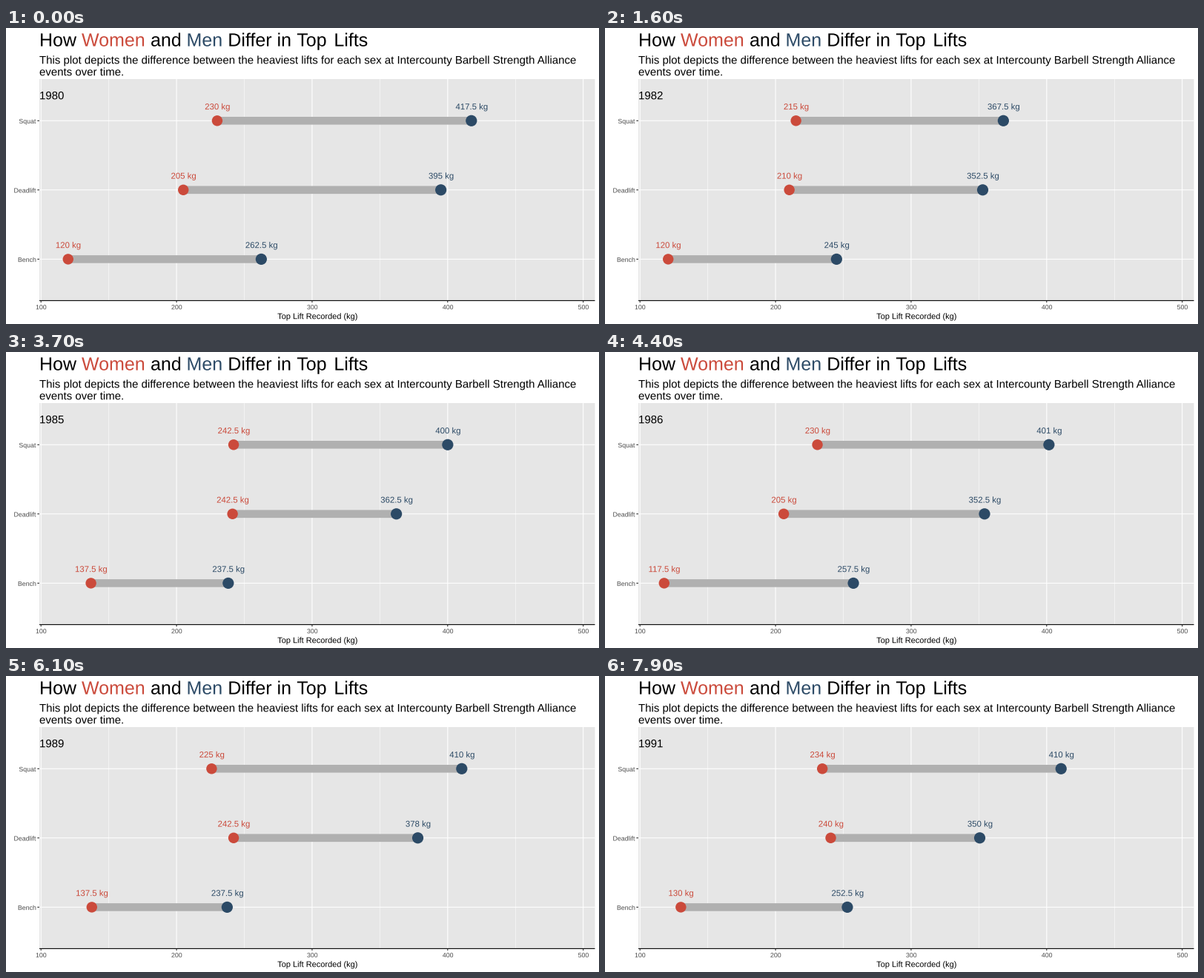
These frames come from a looping animation (800 px wide and 400 px high, 8000 ms). A matplotlib script:

```python
import numpy as np
import matplotlib as mpl
import matplotlib.pyplot as plt
from matplotlib.animation import FuncAnimation
from matplotlib.patches import Circle, PathPatch, Rectangle
from matplotlib.path import Path
from matplotlib.textpath import TextPath

mpl.rcParams["path.snap"] = False

W, H = 800, 400
PT = 0.72  # points per pixel at 100 dpi
FONT = {"family": "Liberation Sans"}
RED, NAVY, BAR = "#CB4A3B", "#2C4A66", "#B0B0B0"
LEFT, RIGHT, TOP, BOTTOM = 45, 794.5, 69, 368.4
ROWS = {"Squat": 125.3, "Deadlift": 218.8, "Bench": 312.4}

FIRST_YEAR = 1980
CYCLE, MOVE = 7, 5  # frames per year, frames spent moving
FRAMES, INTERVAL = 80, 100

# One row per year: (women, men) for squat, deadlift and bench, in kg.
LIFTS = np.array([
    [230, 417.5, 205, 395, 120, 262.5],
    [215, 427.5, 230, 367.5, 150, 245],
    [215, 367.5, 210, 352.5, 120, 245],
    [217.5, 385, 215, 362.5, 145, 245],
    [220, 400, 245, 365, 137.5, 272.5],
    [242.5, 400, 242.5, 362.5, 137.5, 237.5],
    [230, 401, 205, 352.5, 117.5, 257.5],
    [257.5, 422.5, 237.5, 405, 127.5, 255],
    [252.5, 422.5, 230, 377.5, 137.5, 232.5],
    [225, 410, 242.5, 378, 137.5, 237.5],
    [230, 413, 240, 365, 132.5, 245],
    [234, 410, 240, 350, 130, 252.5],
    [250, 430, 262.5, 370, 135, 267.5],
])


def kg_to_x(kg):
    return 47.2 + 1.8287 * (kg - 100)


def text_path(x, y, text, size, align="left"):
    """Outline of text with its baseline at y, in y-down pixels."""
    path = TextPath((0, 0), text, size=size, prop=FONT)
    box = path.get_extents()
    shift = {"left": 0, "center": -(box.x0 + box.x1) / 2 + 0.3, "right": -box.x1}[align]
    return Path(path.vertices * [1, -1] + [x + shift, y], path.codes)


def add_text(x, y, text, size, color="black", align="left"):
    patch = PathPatch(text_path(x, y, text, size, align), fc=color, lw=0, zorder=6)
    return ax.add_patch(patch)


def add_line(xs, ys, color, width):
    ax.plot(xs, ys, color=color, lw=width * PT, solid_capstyle="butt", zorder=2)


def draw_header():
    words = [(45, "How", "black"), (102, "Women", RED), (195, "and", "black"),
             (243.5, "Men", NAVY), (299.3, "Differ in", "black"),
             (392.3, "Top", "black"), (442.4, "Lifts", "black")]
    for x, word, color in words:
        add_text(x, 24.6, word, 25, color)
    add_text(45, 48.3, "This plot depicts the difference between the heaviest lifts "
             "for each sex at Intercounty Barbell Strength Alliance", 15)
    add_text(45, 64.3, "events over time.", 15)


def draw_panel():
    ax.add_patch(Rectangle((LEFT, TOP), RIGHT - LEFT, BOTTOM - TOP,
                           fc="#E6E6E6", lw=0, zorder=1))
    for kg in range(150, 500, 100):
        add_line([kg_to_x(kg)] * 2, [TOP, BOTTOM], "white", 0.55)
    for name, y in ROWS.items():
        add_line([LEFT, RIGHT], [y, y], "white", 1.1)
        add_line([LEFT - 2.7, LEFT], [y, y], "#333333", 1.1)
        add_text(40.3, y + 3.7, name, 8.8, "#4D4D4D", "right")
    for kg in range(100, 501, 100):
        x = kg_to_x(kg)
        add_line([x, x], [TOP, BOTTOM], "white", 1.1)
        add_line([x, x], [BOTTOM, BOTTOM + 2.7], "#333333", 1.1)
        add_text(x, 380.2, str(kg), 8.8, "#4D4D4D", "center")
    add_line([LEFT, RIGHT], [BOTTOM, BOTTOM], "black", 1.1)
    add_text(419.8, 393.2, "Top Lift Recorded (kg)", 11, "black", "center")


def ease(t):
    """Cubic in-out."""
    return 4 * t**3 if t < 0.5 else 1 - 4 * (1 - t)**3


fig = plt.figure(figsize=(W / 100, H / 100), dpi=100, facecolor="white")
ax = fig.add_axes([0, 0, 1, 1])
ax.set_xlim(0, W)
ax.set_ylim(H, 0)
ax.axis("off")

draw_header()
draw_panel()
year_text = add_text(45, 96.3, str(FIRST_YEAR), 15)

row_ys = list(ROWS.values())
bars = [ax.add_patch(Rectangle((0, y - 5.3), 0, 10.6, fc=BAR, lw=0, zorder=3))
        for y in row_ys]
dots, labels = [], []
for y in row_ys:
    for color, radius in ((RED, 7.2), (NAVY, 7.6)):
        dots.append(ax.add_patch(Circle((0, y), radius, fc=color, lw=0, zorder=4)))
        labels.append(add_text(0, y, "0 kg", 11.4, color))


def update(frame):
    step = max(0, (frame - 1) // CYCLE)
    t = min(1, max(0, (frame - 1 - CYCLE * step) / MOVE))
    nearest = step + (t > 0.5)
    xs = kg_to_x(LIFTS[step] + (LIFTS[step + 1] - LIFTS[step]) * ease(t))

    year_text.set_path(text_path(45, 96.3, str(FIRST_YEAR + nearest), 15))
    for bar, women, men in zip(bars, xs[::2], xs[1::2]):
        bar.set_x(women)
        bar.set_width(men - women)
    for dot, label, x, kg in zip(dots, labels, xs, LIFTS[nearest]):
        y = dot.center[1]
        dot.center = x, y
        label.set_path(text_path(x, y - 15.2, f"{kg:g} kg", 11.4, "center"))
    return [year_text, *bars, *dots, *labels]


anim = FuncAnimation(fig, update, frames=FRAMES, interval=INTERVAL,
                     repeat=True, repeat_delay=0)
plt.show()
```
